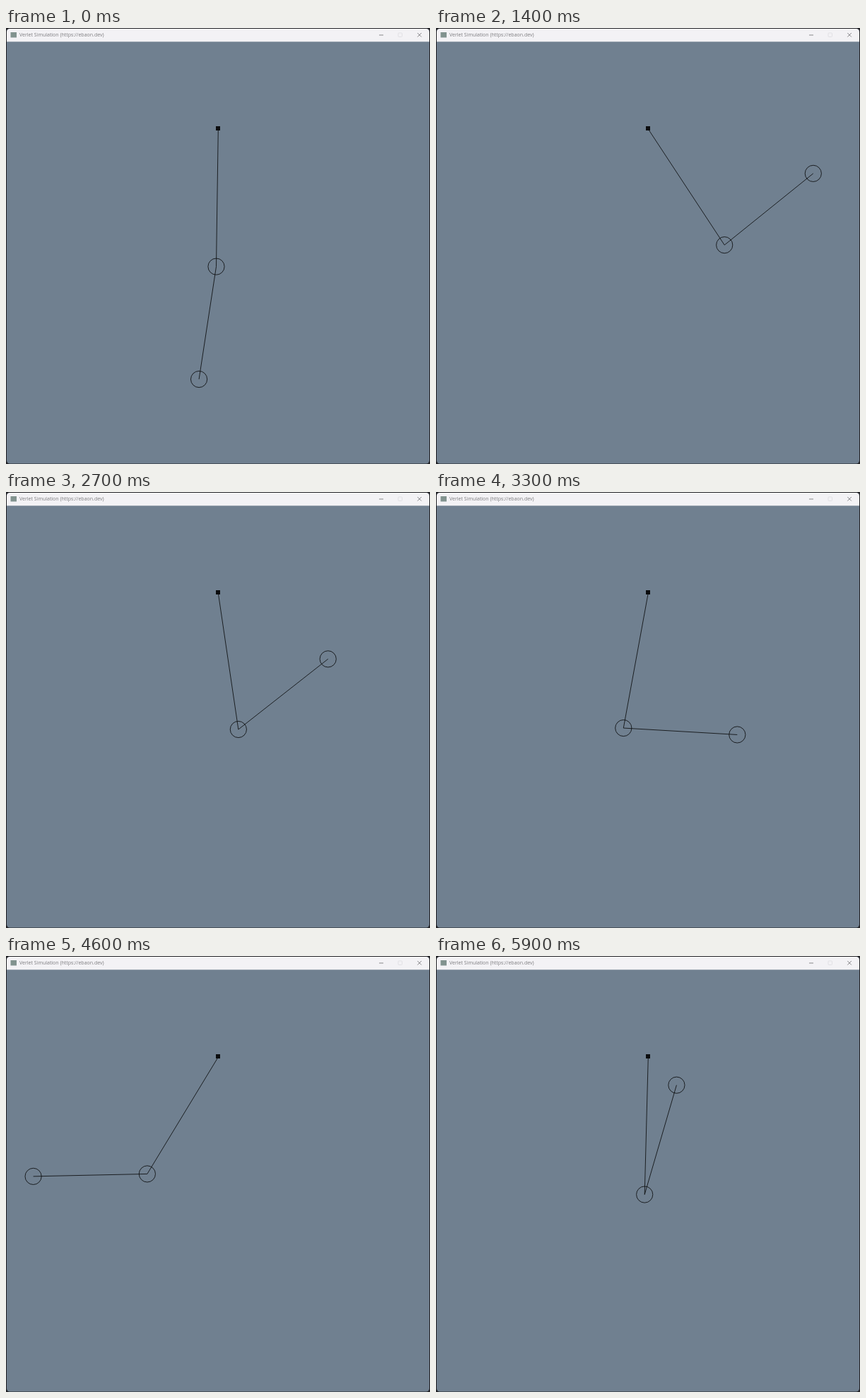
An HTML page for the animation above (6000 ms loop, 600 by 617 pixels).

```html
<!DOCTYPE html>
<html lang="en">
<head>
<meta charset="utf-8">
<title>Verlet Simulation</title>
<style>
  html, body { margin: 0; width: 100%; height: 100%; overflow: hidden; background: #222226; }
  svg { display: block; }
  text { font: 7px "Open Sans", "Noto Sans", sans-serif; fill: #7c7c7f; }
  .ink { fill: none; stroke: #0c0d0f; stroke-width: .85; }
  .button { fill: none; stroke: #6c6c70; stroke-width: .8; }
</style>
</head>
<body>
<svg width="600" height="617" viewBox="0 0 600 617">
  <clipPath id="window"><rect x="1" y="1" width="598" height="615.5" rx="4.5"/></clipPath>
  <g clip-path="url(#window)">
    <rect width="600" height="617" fill="#708090"/>
    <rect width="600" height="19.4" fill="#f3f2f5"/>
  </g>
  <rect x="6.5" y="6" width="8.5" height="7.5" fill="#82938f"/>
  <text x="19" y="12.4">Verlet Simulation (https://ebaon.dev)</text>
  <path class="button" d="M528 10h6M582.3 7l5.6 5.6m0-5.6l-5.6 5.6"/>
  <rect class="button" x="555" y="7" width="5.5" height="5.5" rx="1" style="stroke:#dcdce0"/>
  <rect x="297" y="139" width="6" height="6" fill="#0c0d0f"/>
  <polyline class="ink" id="rods"/>
  <circle class="ink" id="upper" r="11.6"/>
  <circle class="ink" id="lower" r="11.6"/>
</svg>
<script>
const LOOP = 6, STEP = 0.1;
const pivot = [303, 141.5];

// Angles are radians from straight down, at even intervals over the loop
const upperRod = { length: 196.2, angles: [-.028, .353, .56, .498, .15, -.209, -.46, -.549, -.326, .012] };
const lowerRod = { length: 161.3, angles: [-.152, 1.29, 2.187, 2.57, 2.265, 1.454, -.12, -1.689, -2.834, -3.525] };

// Catmull-Rom curve through the key angles, with the ends continued straight
function angleAt(t, keys) {
  const x = t / LOOP * (keys.length - 1), i = Math.floor(x), u = x - i;
  const b = keys[i], c = keys[i + 1];
  const a = keys[i - 1] ?? 2 * b - c, d = keys[i + 2] ?? 2 * c - b;
  return b + u / 2 * (c - a + u * (2 * a - 5 * b + 4 * c - d + u * (3 * (b - c) + d - a)));
}

function swing([x, y], rod, t) {
  const angle = angleAt(t, rod.angles);
  return [x + rod.length * Math.sin(angle), y + rod.length * Math.cos(angle)];
}

function place(id, [x, y]) {
  const circle = document.getElementById(id);
  circle.setAttribute("cx", x);
  circle.setAttribute("cy", y);
}

function draw(now) {
  const t = Math.floor((now / 1000 % LOOP) / STEP + 1e-6) * STEP % LOOP;
  const upper = swing(pivot, upperRod, t);
  const lower = swing(upper, lowerRod, t);
  place("upper", upper);
  place("lower", lower);
  document.getElementById("rods").setAttribute("points", [[300.3, 143], upper, lower].join(" "));
}

let start;
function tick(now) {
  start ??= now;
  draw(now - start);
  requestAnimationFrame(tick);
}
draw(0);
requestAnimationFrame(tick);
</script>
</body>
</html>
```
